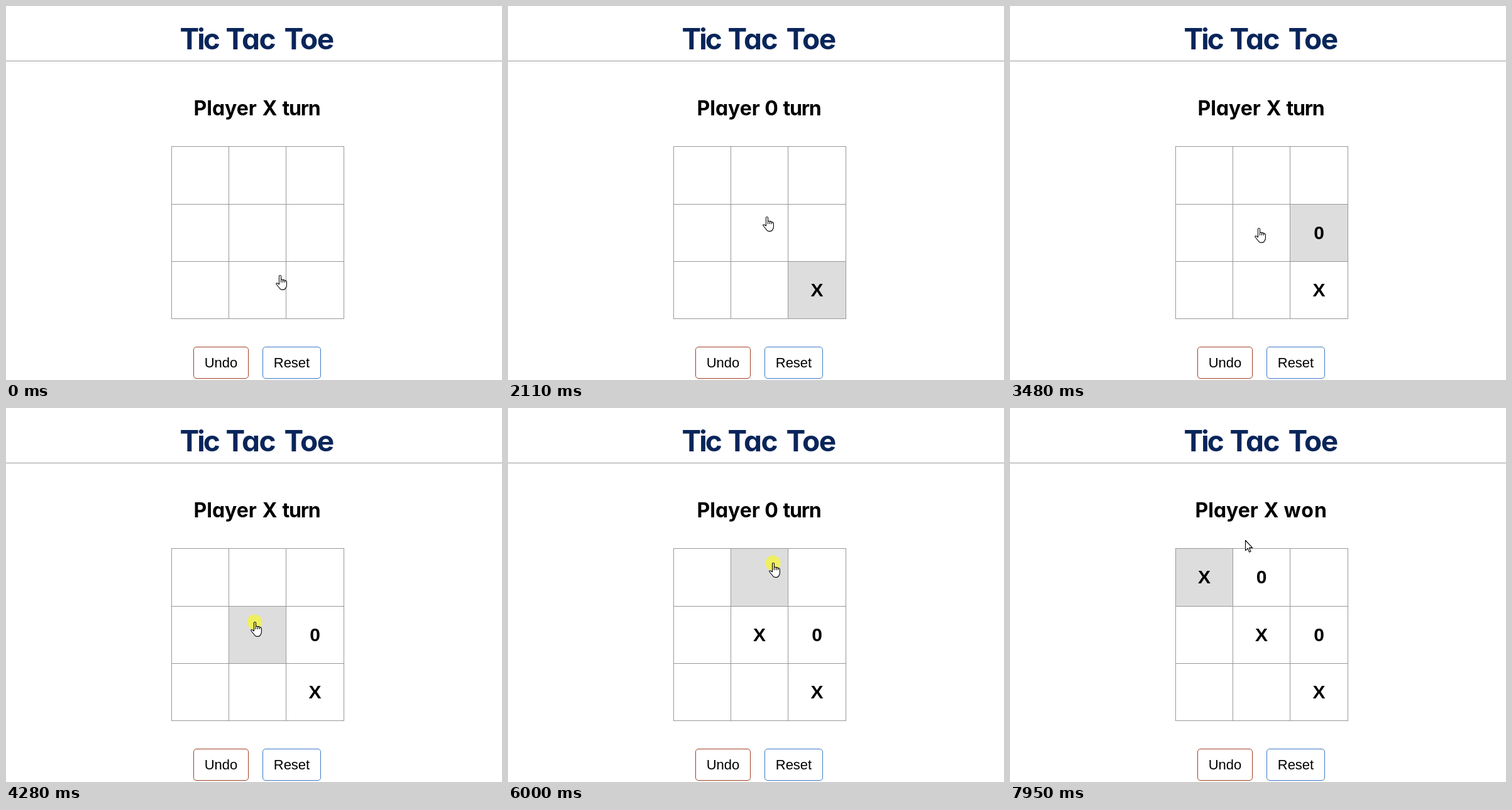
Recreate the animation shown at these times as an HTML page. Size 789 by 595 pixels, loop 8000 ms.

```html
<!DOCTYPE html>
<html lang="en">
<head>
<meta charset="utf-8">
<title>Tic Tac Toe</title>
<style>
  html, body { margin: 0; width: 100%; height: 100%; overflow: hidden; background: #fff; }
  svg { display: block; width: 789px; height: 595px; }
  .heading { font: 700 46px Inter, sans-serif; font-feature-settings: "cv11"; fill: #09255a; }
  .status { font: 700 32px Inter, sans-serif; font-feature-settings: "cv11"; }
  .mark { font: 700 30px "Liberation Sans", sans-serif; text-anchor: middle; }
  .button { font: 22px "Liberation Sans", sans-serif; text-anchor: middle; }
  .ink { stroke: #000; stroke-width: 1.1; stroke-linejoin: round; fill: #fff; }
</style>
</head>
<body>
<svg viewBox="0 0 789 595">
  <g class="heading">
    <text x="276.5" y="69" letter-spacing="-3">Tic</text>
    <text x="349.5" y="69" letter-spacing="-1.5">Tac</text>
    <text x="442.5" y="69" letter-spacing="-1.5">Toe</text>
  </g>
  <rect y="87" width="789" height="1" fill="#9a9a9a"/>
  <g class="status">
    <text id="player" y="174">Player</text>
    <text id="symbol" y="174" text-anchor="middle"></text>
    <text id="verb" y="174"></text>
  </g>
  <rect id="focus" fill="#ddd"/>
  <g id="lines" fill="#999"></g>
  <g id="marks" class="mark"></g>
  <g class="button">
    <rect x="298.5" y="542.5" width="87" height="50" rx="4.5" fill="none" stroke="#a04020"/>
    <text x="342" y="575">Undo</text>
    <rect x="408.5" y="542.5" width="92" height="50" rx="4.5" fill="none" stroke="#3a78c8"/>
    <text x="454.5" y="575">Reset</text>
  </g>
  <circle id="click" r="12" fill="#f5f532" fill-opacity=".72"/>
  <g id="hand" class="ink">
    <path d="M5.5 15V2Q5.5 .6 7 .6T8.5 2V8.2Q8.6 7 10 7T11.5 8.6Q11.7 7.6 13 7.6T14.4 9.2Q14.8 8.6 15.8 8.9T17.4 10.8V16Q17.4 18.5 16 20.5Q14.6 23.4 12 23.4H10Q7.4 23.4 6.2 21L1 14.5Q.3 13.2 1.5 12.7Q3 12.5 5.5 15M8.5 8V12M11.5 8.6V12M14.4 9.2V12"/>
    <path id="finger" stroke="none" d="M6 12V2Q6 1.1 7 1.1T8 2V12Z"/>
  </g>
  <path id="arrow" class="ink" d="M.5 .5V16.8L4.2 13.3 6.7 19.2 9 18.2 6.5 12.4H11.6Z"/>
</svg>
<script>
const DURATION = 8000;
const colX = [263, 354, 445, 537], rowY = [223, 315, 406, 497];

// Press focuses a cell, release places the mark.
const turns = [
  { down: 790, up: 940, col: 2, row: 2, mark: "X" },
  { down: 2990, up: 3160, col: 2, row: 1, mark: "0" },
  { down: 4280, up: 4450, col: 1, row: 1, mark: "X" },
  { down: 6000, up: 6170, col: 1, row: 0, mark: "0" },
  { down: 7250, up: 7420, col: 0, row: 0, mark: "X" }
];

// Pointer moves: first step, last step, step count, end position.
const start = [429, 428];
const moves = [
  [300, 470, 3, 501, 461],
  [1120, 1340, 4, 428, 400],
  [1410, 1560, 3, 457, 333],
  [1960, 2110, 3, 405, 335],
  [2510, 2660, 3, 480, 353],
  [3240, 3480, 4, 389, 353],
  [3530, 3740, 4, 394, 315],
  [3820, 4050, 4, 389, 340],
  [4680, 4920, 4, 501, 242],
  [5160, 5300, 3, 415, 246],
  [6410, 6790, 6, 296, 252],
  [7720, 7950, 4, 367, 210]
];

const statuses = {
  X: { player: 298.5, symbol: 419.5, verb: 439.5, word: "turn", spacing: -1.2 },
  0: { player: 300.5, symbol: 419, verb: 437.5, word: "turn", spacing: -1.2 },
  won: { player: 294.5, symbol: 415.5, verb: 435.5, word: "won", spacing: 1 }
};

const $ = id => document.getElementById(id);
function set(node, attrs) {
  for (const name in attrs) node.setAttribute(name, attrs[name]);
  return node;
}
function add(parent, tag, attrs) {
  const node = document.createElementNS("http://www.w3.org/2000/svg", tag);
  return parent.appendChild(set(node, attrs));
}
const show = (node, visible) => set(node, { visibility: visible ? "visible" : "hidden" });

for (const x of colX) add($("lines"), "rect", { x, y: 223, width: 1, height: 275 });
for (const y of rowY) add($("lines"), "rect", { x: 263, y, width: 275, height: 1 });
for (const turn of turns) {
  turn.node = add($("marks"), "text", {
    x: (colX[turn.col] + colX[turn.col + 1] + 1) / 2,
    y: rowY[turn.row] + 56
  });
  turn.node.textContent = turn.mark;
}

function pointerAt(time) {
  let [x, y] = start;
  for (const [from, to, steps, endX, endY] of moves) {
    if (time < from) break;
    const step = Math.floor((time - from) / (to - from) * (steps - 1) + 1e-6) + 1;
    const left = 1 - Math.min(1, step / steps);
    const eased = 1 - left ** 1.4;
    x += (endX - x) * eased;
    y += (endY - y) * eased;
  }
  return [Math.round(x), Math.round(y)];
}

function drawStatus(played) {
  const key = played === turns.length ? "won" : played % 2 ? "0" : "X";
  const layout = statuses[key];
  set($("player"), { x: layout.player });
  set($("symbol"), { x: layout.symbol }).textContent = key === "won" ? "X" : key;
  set($("verb"), { x: layout.verb, "letter-spacing": layout.spacing }).textContent = layout.word;
}

function draw(time) {
  const focused = turns.filter(turn => time >= turn.down).pop();
  show($("focus"), focused);
  if (focused) {
    const { col, row } = focused;
    set($("focus"), {
      x: colX[col] + 1, y: rowY[row] + 1,
      width: colX[col + 1] - colX[col] - 1, height: rowY[row + 1] - rowY[row] - 1
    });
  }
  for (const turn of turns) show(turn.node, time >= turn.up);
  drawStatus(turns.filter(turn => time >= turn.up).length);

  const [x, y] = pointerAt(time);
  const pressed = focused && time < focused.up;
  const overBoard = y >= 223;
  show($("click"), pressed);
  set($("click"), { cx: x + 6.5, cy: y + .5 });
  set($("finger"), { fill: pressed ? "#eeee62" : "#fff" });
  set($("hand"), { transform: `translate(${x} ${y})` });
  set($("arrow"), { transform: `translate(${x + 7} ${y})` });
  show($("hand"), overBoard);
  show($("arrow"), !overBoard);
}

const origin = performance.now();
function tick() {
  draw((performance.now() - origin) % DURATION);
  requestAnimationFrame(tick);
}
tick();
</script>
</body>
</html>
```
